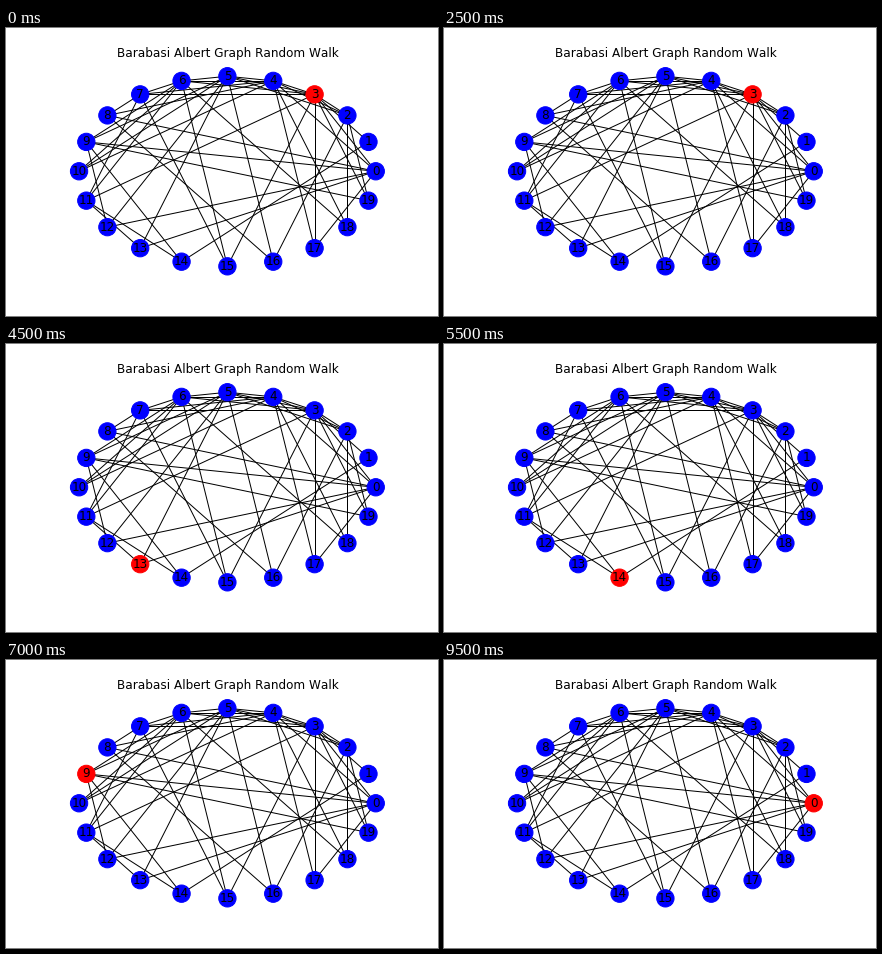
Animation, 432 px wide and 288 px high, one loop 10000 ms. Source, as a matplotlib script:

```python
import numpy as np
import matplotlib.pyplot as plt
from matplotlib.animation import FuncAnimation
from matplotlib.collections import LineCollection

NODE_COUNT = 20
NODE_SIZE = 300
STEP_MS = 500

# Chords by span: node n links back to node n - span.
CHORDS = {
    1: range(3, 9),
    2: [*range(3, 7), 13],
    3: [*range(3, 10, 2), 6, 12, 14],
    4: [4, *range(7, 12)],
    5: [10, 11, 14],
    6: [10],
    7: [12],
    8: [8, *range(11, 16, 2), 16],
    9: [9, 15],
    10: [19],
    11: [16],
    12: range(12, 19, 3),
    13: [13, 14, 17],
    14: range(16, 19),
    16: [18, 19],
    17: [17, 19],
}


def there_and_back(*stops):
    return [*stops, *stops[-2::-1]]


WALK = [3, 5, 4, *there_and_back(3, 4), *there_and_back(11, 13, 5),
        *there_and_back(14, 9), 9, 0, *there_and_back(3, 2), 0]

plt.rcParams["font.family"] = "DejaVu Sans"
plt.rcParams["text.kerning_factor"] = 6
fig = plt.figure(figsize=(6, 4), dpi=72, facecolor="white")
ax = fig.add_axes([0.125, 0.125, 0.775, 0.755])
ax.set_axis_off()
ax.set_title("Barabasi Albert Graph Random Walk", fontsize=12, pad=6)

# Leave room for the marker radius plus a 5% margin on each side.
radius = np.sqrt(NODE_SIZE) / 2
x_limit = 1.1 * (1 + radius / (0.775 * 432))
y_limit = 1.1 * (1 + radius / (0.755 * 288))
ax.set_xlim(-x_limit, x_limit)
ax.set_ylim(-y_limit, y_limit)

angles = 2 * np.pi * np.arange(NODE_COUNT) / NODE_COUNT
positions = np.column_stack([np.cos(angles), np.sin(angles)])

edges = [(positions[n], positions[n - span])
         for span, ends in CHORDS.items() for n in ends]
ax.add_collection(LineCollection(edges, colors="black", linewidths=1, zorder=1),
                  autolim=False)
nodes = ax.scatter(*positions.T, s=NODE_SIZE, c=["blue"] * NODE_COUNT,
                   linewidths=1, zorder=2)
for label, (x, y) in enumerate(positions):
    ax.text(x, y, str(label), fontsize=12, ha="center", va="center", zorder=3)


def update(step):
    colors = ["blue"] * NODE_COUNT
    colors[WALK[step]] = "red"
    nodes.set_color(colors)
    return [nodes]


anim = FuncAnimation(fig, update, frames=len(WALK), interval=STEP_MS,
                     repeat=True, repeat_delay=0)
plt.show()
```
